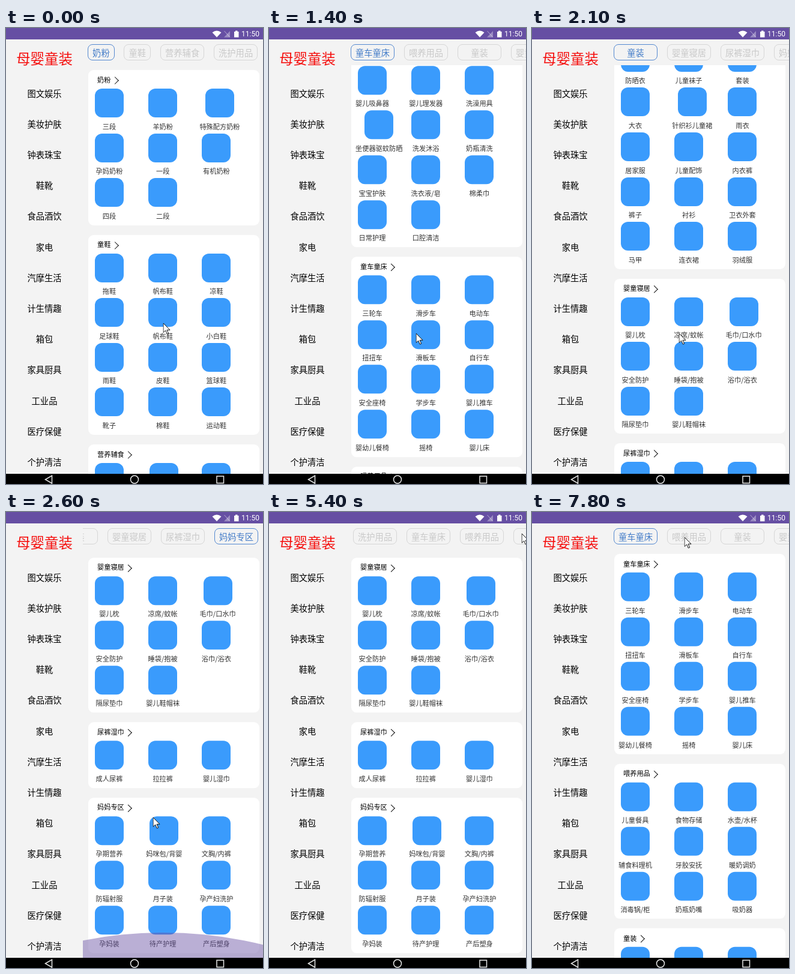
Recreate the animation shown at these times as an HTML page. Size 428 by 760 pixels, loop 8000 ms.

```html
<!DOCTYPE html>
<html lang="zh-CN">
<head>
<meta charset="utf-8">
<title>母婴童装</title>
<style>
html, body { margin: 0; width: 428px; height: 760px; overflow: hidden; }
body { position: relative; background: #f3f3f3; color: #000; font-family: "Noto Sans CJK SC", "Noto Sans CJK", "Noto Sans", sans-serif; }
div { box-sizing: border-box; white-space: nowrap; }
svg { position: absolute; left: 0; top: 0; }
.status { position: absolute; width: 428px; height: 19px; background: #664fa3; }
.clock { position: absolute; right: 6px; top: 1px; color: #fff; font: 12px/18px Roboto, sans-serif; }
.head { position: absolute; top: 33px; width: 128px; text-align: center; font-size: 23.4px; line-height: 34px; color: #f5100f; }
.side { position: absolute; top: 82.6px; width: 128px; text-align: center; font-size: 14.3px; line-height: 51.2px; }
.strip { position: absolute; left: 128px; top: 19px; width: 300px; height: 43px; overflow: hidden; }
#tabs { position: absolute; left: 8px; top: 8px; display: flex; gap: 15.7px; }
.tab { flex: none; width: 73.3px; height: 27px; border: 1px solid #d6d6d6; border-radius: 8px; text-align: center; font-size: 14.3px; line-height: 25px; color: #c9c9c9; }
.tab.short { width: 44.8px; }
.tab.on { color: #437cc8; border-color: #5488d0; }
.view { position: absolute; left: 128px; top: 62px; width: 300px; height: 681px; overflow: hidden; }
#list { position: absolute; left: 8.5px; top: 8px; }
.card { position: absolute; width: 285.5px; background: #fff; border-radius: 9px; }
.name { position: absolute; left: 15.5px; top: 7.5px; font-size: 11.2px; line-height: 16px; }
.name::after { content: ""; position: absolute; left: calc(100% + 2.5px); top: 5.5px; width: 8px; height: 8px; border: solid #111; border-width: 1px 1px 0 0; transform: rotate(45deg); }
.item { position: absolute; min-width: 56px; text-align: center; font-size: 11.2px; line-height: 16px; color: #333; }
.item::before { content: ""; display: block; width: 48px; height: 48px; margin: 0 auto 6.6px; border-radius: 12px; background: #3a9bfc; }
#glow { position: absolute; left: -556px; top: 639px; width: 1380px; height: 1380px; border-radius: 50%; background: #664fa3; }
</style>
</head>
<body>
<div class="strip"><div id="tabs"></div></div>
<div class="view"><div id="list"></div><div id="glow"></div></div>
<div class="head">母婴童装</div>
<div class="side" id="side"></div>
<div class="status"><div class="clock">11:50</div></div>
<svg width="428" height="760" fill="none">
  <path d="M343.5 7.5Q351 1.5 358.5 7.5L351 15.5Z" fill="#fff"/>
  <path d="M363 15.5L373 5V15.5Z" fill="#fff" opacity=".35"/>
  <path d="M363.5 5L372.5 15" stroke="#fff" opacity=".5"/>
  <path d="M380 6H382V4.5H385.5V6H387.5V15.5H380Z" fill="#fff"/>
  <path d="M0 743H428V760H0Z" fill="#000"/>
  <g stroke="#e8e8e8" stroke-width="1.5">
    <path d="M76.5 746V759L65.5 752.5Z"/>
    <circle cx="214" cy="752.5" r="6.5"/>
    <path d="M351 747H362.5V758.5H351Z"/>
  </g>
</svg>
<svg id="cursor" width="14" height="22"><path d="M.5 .5V16L4.2 12.6L6.8 18.6L9.2 17.6L6.6 11.8H11.5Z" fill="#fff" stroke="#111"/></svg>
<script>
const LOOP = 8000, STEP = 100, ROW = 74.6;
const $ = id => document.getElementById(id);

const menu = '图文娱乐 美妆护肤 钟表珠宝 鞋靴 食品酒饮 家电 汽摩生活 计生情趣 箱包 家具厨具 工业品 医疗保健 个护清洁';
const sections = [
  '奶粉 三段 羊奶粉 特殊配方奶粉 孕妈奶粉 一段 有机奶粉 四段 二段',
  '童鞋 拖鞋 帆布鞋 凉鞋 足球鞋 帆布鞋 小白鞋 雨鞋 皮鞋 篮球鞋 靴子 棉鞋 运动鞋',
  '营养辅食 米粉 面条/粥米粉 果泥 磨牙饼干 益生菌 维生素 钙铁锌 鱼肝油 肉松 泡芙 溶豆 果汁',
  '洗护用品 护臀霜 爽身粉 润肤油 婴儿吸鼻器 婴儿理发器 洗澡用具 坐便器驱蚊防晒 洗发沐浴 奶瓶清洗 宝宝护肤 洗衣液/皂 棉柔巾 日常护理 口腔清洁',
  '童车童床 三轮车 滑步车 电动车 扭扭车 滑板车 自行车 安全座椅 学步车 婴儿推车 婴幼儿餐椅 摇椅 婴儿床',
  '喂养用品 儿童餐具 食物存储 水壶/水杯 辅食料理机 牙胶安抚 暖奶调奶 消毒锅/柜 奶瓶奶嘴 吸奶器',
  '童装 毛衣 婴儿礼盒 汉服 防晒衣 儿童袜子 套装 大衣 针织衫儿童裙 雨衣 居家服 儿童配饰 内衣裤 裤子 衬衫 卫衣外套 马甲 连衣裙 羽绒服',
  '婴童寝居 婴儿枕 凉席/蚊帐 毛巾/口水巾 安全防护 睡袋/抱被 浴巾/浴衣 隔尿垫巾 婴儿鞋帽袜',
  '尿裤湿巾 成人尿裤 拉拉裤 婴儿湿巾',
  '妈妈专区 孕期营养 妈咪包/背婴 文胸/内裤 防辐射服 月子装 孕产妇洗护 孕妈装 待产护理 产后塑身'
];

function add(parent, cls, text, style) {
  const el = document.createElement('div');
  el.className = cls;
  el.textContent = text;
  Object.assign(el.style, style);
  return parent.appendChild(el);
}

menu.split(' ').forEach(text => add($('side'), '', text));

const tops = [];
let y = 0;
const tabs = sections.map((section, i) => {
  const [name, ...items] = section.split(' ');
  const rows = Math.ceil(items.length / 3);
  const card = add($('list'), 'card', '', { top: y + 'px', height: 35 + rows * ROW + 'px' });
  add(card, 'name', name);
  items.forEach((text, k) => add(card, 'item', text, {
    left: 7.5 + k % 3 * 89.2 + 'px',
    top: 31 + Math.floor(k / 3) * ROW + 'px'
  }));
  tops.push(y);
  y += 50.9 + rows * ROW;
  return add($('tabs'), i < 2 ? 'tab short' : 'tab', name);
});
const bottom = tops[7] - 6;

// [time, strip offset, selected tab]
const picks = [
  [0, 0, 0], [1100, 60.5, 1], [1200, 121, 2], [1300, 210, 3], [1400, 299, 4],
  [1700, 388, 5], [1800, 388, -1], [1900, 477, 6], [2200, 533, 7], [2400, 533, 8],
  [2500, 533, 9], [3500, 533, 8], [6300, 299, 4]
];
const drag = [[4800, 533], [5400, 206], [5700, 198], [6300, 198]];
const pointer = [
  [0, 262, 492], [200, 262, 492], [800, 250, 690], [900, 250, 690], [1100, 245, 509],
  [2700, 245, 509], [3300, 280, 44], [3900, 280, 44], [4700, 172, 46], [4900, 172, 46],
  [5400, 421, 36], [5700, 421, 36], [6200, 262, 43], [6800, 262, 43], [7600, 254, 42]
];

// Eased value of a keyed track
function track(keys, t) {
  const next = keys.findIndex(key => key[0] > t);
  if (next < 0) return keys[keys.length - 1].slice(1);
  if (next === 0) return keys[0].slice(1);
  const a = keys[next - 1], b = keys[next];
  const p = (t - a[0]) / (b[0] - a[0]), e = p * p * (3 - 2 * p);
  return a.slice(1).map((v, i) => v + (b[i + 1] - v) * e);
}

function listScroll(t) {
  if (t >= 6300) return tops[4];
  const fling = 1802.7 + 1351.8 * (1 - Math.exp((1800 - t) / 940));
  return Math.min(bottom, Math.max(0, fling));
}

function glowLevel(t) {
  if (t < 2500) return 0;
  return t < 2600 ? (t - 2500) / 100 : Math.max(0, 1 - (t - 2600) / 600) ** 2;
}

function render(t) {
  const [, offset, selected] = picks.filter(pick => pick[0] <= t).pop();
  const strip = t >= 4800 && t < 6300 ? track(drag, t)[0] : offset;
  const [px, py] = track(pointer, t);
  const glow = glowLevel(t);
  $('tabs').style.transform = `translateX(${-strip}px)`;
  tabs.forEach((tab, i) => tab.classList.toggle('on', i === selected));
  $('list').style.transform = `translateY(${-listScroll(t)}px)`;
  $('glow').style.transform = `translateY(${42 * (1 - glow)}px)`;
  $('glow').style.opacity = 0.45 * glow;
  $('cursor').style.transform = `translate(${px - 0.5}px, ${py - 0.5}px)`;
}

const start = performance.now();
function tick() {
  const t = (performance.now() - start) % LOOP;
  render(Math.floor(t / STEP) * STEP);
  requestAnimationFrame(tick);
}
tick();
</script>
</body>
</html>
```
